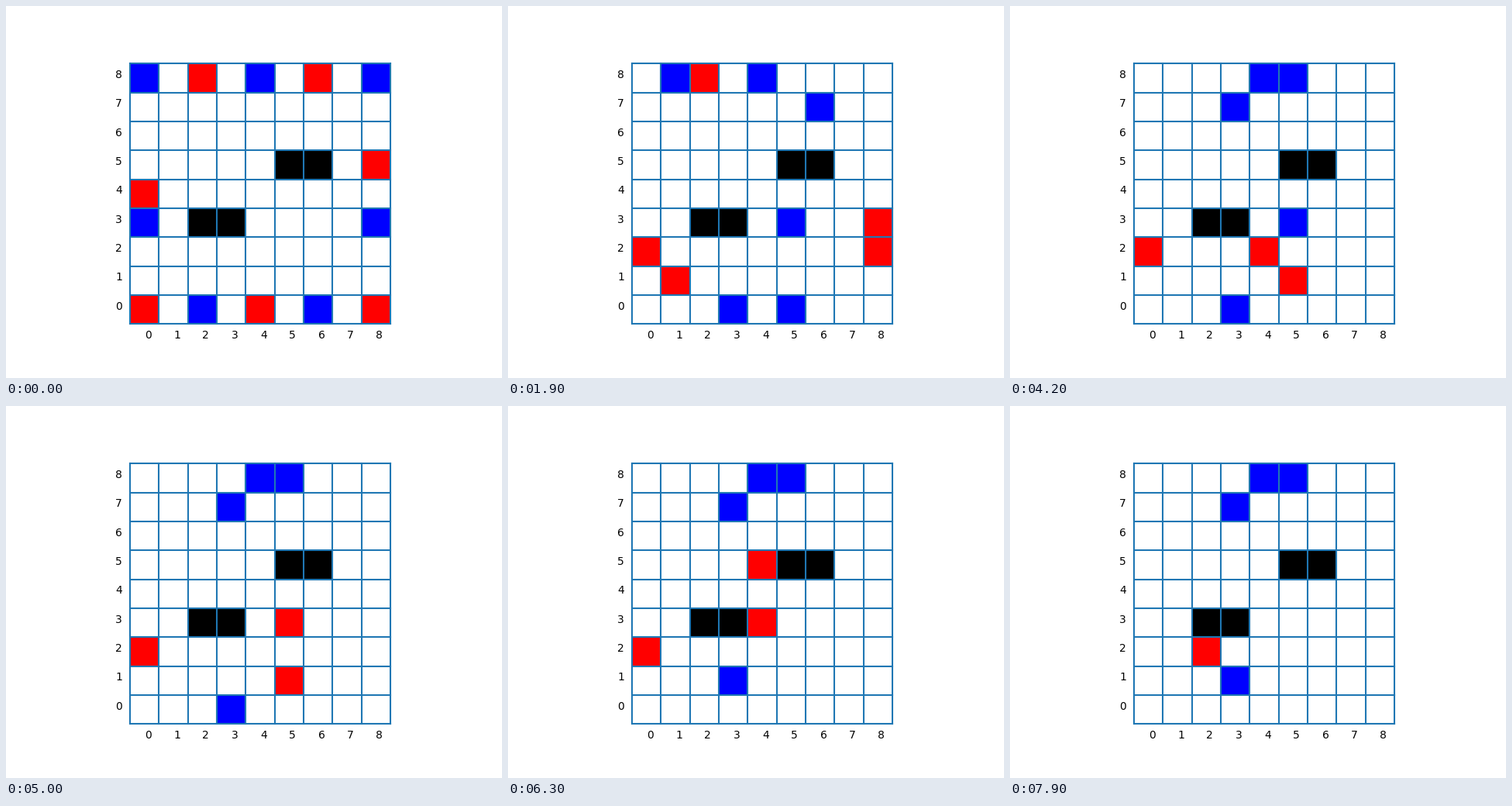
Animation, 640 px wide and 480 px high, one loop 8 s. Source, as a matplotlib script:

```python
import matplotlib.pyplot as plt
from matplotlib.animation import FuncAnimation
from matplotlib.patches import Rectangle

N = 9
FRAMES, INTERVAL = 80, 100
WALLS = "23 33 55 65"
START = {"blue": "08 48 88 03 83 20 60", "red": "28 68 85 04 00 40 80"}

# Paths are walked one cell per turn; each cell is written as column, row.
BLUE_PATHS = ("20-30 60-50 83-73-63-53 03-02 88-78-68 08-18 68-67 18-28-38-37 "
              "67-57-58 50" + "-40-41" * 3 + " 53-63-53 30" + "-31-30" * 8 + "-31")
RED_PATHS = ("85-84 80-81 84-83 81-82 00-01 04-03 68-58 03-02 01-11 28-38 "
             "11-21-31 82-72-62-61 83-73-72-62-52 61-51 52-42 51-52 42-43 "
             "43-53 52-51 51-41-42-43 53-54-44-45 45-46-47 43-44-45-46-47 02-12-22")


def cell(code):
    return int(code[0]), int(code[1])


def moves(paths):
    for path in paths.split():
        stops = [cell(c) for c in path.split("-")]
        yield from zip(stops, stops[1:])


def surrounded(board, pos):
    """A piece is lost when two enemies stand next to it."""
    x, y = pos
    near = [(x + 1, y), (x - 1, y), (x, y + 1), (x, y - 1)]
    return sum(board.get(p, board[pos]) != board[pos] for p in near) >= 2


def play():
    board = {cell(c): color for color, cells in START.items() for c in cells.split()}
    history = [dict(board)]
    turns = [moves(BLUE_PATHS), moves(RED_PATHS)]
    for turn in range(FRAMES - 1):
        src, dst = next(turns[turn % 2])
        board[dst] = board.pop(src)
        lost = [p for p in board if surrounded(board, p)]
        for p in lost:
            del board[p]
        history.append(dict(board))
    return history


fig, ax = plt.subplots(figsize=(6.4, 4.8), dpi=100)
ax.set_aspect("equal")
ax.set_xlim(-0.05 * N, 1.05 * N)
ax.set_ylim(-0.05 * N, 1.05 * N)
ax.axis("off")

for i in range(N + 1):
    ax.plot([0, N], [i, i], color="C0", lw=1.5)
    ax.plot([i, i], [0, N], color="C0", lw=1.5)
for i in range(N):
    ax.text(i + 0.5, -0.5, str(i), fontsize=10, family="DejaVu Sans")
    ax.text(-0.5, i + 0.5, str(i), fontsize=10, family="DejaVu Sans")


def square(pos, color):
    return ax.add_patch(Rectangle(pos, 1, 1, fc=color, lw=0))


for code in WALLS.split():
    square(cell(code), "black")

history = play()
squares = {(x, y): square((x, y), "white") for x in range(N) for y in range(N)
           if f"{x}{y}" not in WALLS.split()}


def update(frame):
    for pos, patch in squares.items():
        patch.set_facecolor(history[frame].get(pos, "white"))
    return list(squares.values())


anim = FuncAnimation(fig, update, frames=FRAMES, interval=INTERVAL,
                     repeat=True, repeat_delay=0)
plt.show()
```
